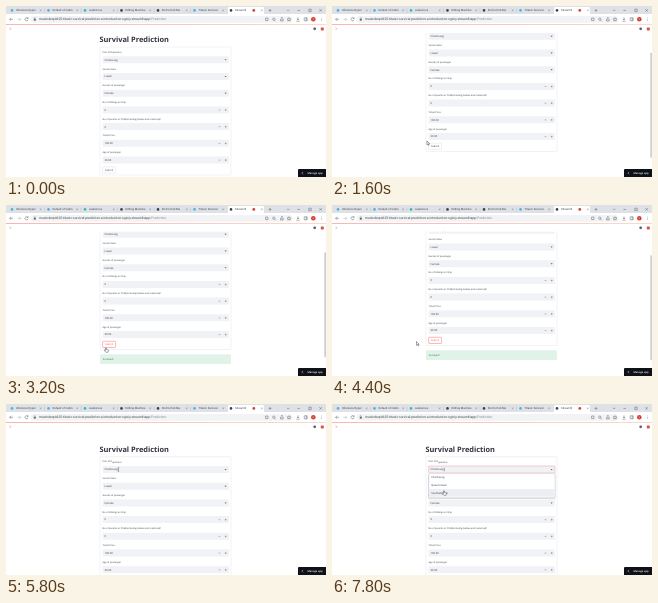
These frames come from a looping animation (320x171 px, 8000 ms). An HTML page:

```html
<!DOCTYPE html>
<html lang="en">
<head>
<meta charset="utf-8">
<title>Survival Prediction</title>
<style>
html, body { margin: 0; width: 100%; height: 100%; overflow: hidden; background: #fff; }
svg { display: block; width: 100vw; height: 100vh; }
text { font-family: "Open Sans", sans-serif; fill: #31333f; white-space: pre; text-rendering: geometricPrecision; }
.ui text { font-family: Roboto, sans-serif; fill: #3c4043; }
.line { fill: none; stroke: #5f6368; stroke-width: .5; }
</style>
</head>
<body>
<svg id="stage" viewBox="0 0 320 171">
  <defs>
    <linearGradient id="accent">
      <stop offset="0" stop-color="#f58a86"/><stop offset="1" stop-color="#f9c3b0"/>
    </linearGradient>
  </defs>
  <rect width="320" height="171" fill="#fff"/>
  <g id="page"></g>
  <g id="header"></g>
  <g id="browser" class="ui"></g>
  <g id="pointer"></g>
</svg>
<script>
const LOOP = 8000, STEP = 200, RED = '#ff4b4b';
const $ = id => document.getElementById(id);

function add(parent, tag, attrs, content) {
  const el = document.createElementNS('http://www.w3.org/2000/svg', tag);
  for (const k in attrs) el.setAttribute(k, attrs[k]);
  if (content !== undefined) el.textContent = content;
  parent.appendChild(el);
  return el;
}
const rect = (p, x, y, width, height, fill, more) => add(p, 'rect', { x, y, width, height, fill, ...more });
// A hair of rotation keeps tiny glyphs from being hinted flat
const text = (p, x, y, size, str, more) =>
  add(p, 'text', { x, y, 'font-size': size, transform: `rotate(.02 ${x} ${y})`, ...more }, str);
const path = (p, d, more) => add(p, 'path', { d, class: 'line', ...more });
const dot = (p, cx, cy, r, fill) => add(p, 'circle', { cx, cy, r, fill });
const show = (el, on) => el.setAttribute('display', on ? 'inline' : 'none');

// Form
const page = $('page');
text(page, 93.4, 36, 7.42, 'Survival Prediction', { 'font-weight': 700 });
rect(page, 94, 41, 131, 128, 'none', { rx: .8, stroke: '#dcdde2', 'stroke-width': .4 });

const fields = [
  ['Port of Departure', 'Cherbourg', true],
  ['Social Status', 'Lower', true],
  ['Gender of passenger', 'Female', true],
  ['No of Siblings on Ship', '0'],
  ['No of parents or Child(including babies and maternal)?', '0'],
  ['Ticket Price', '100.00'],
  ['Age of passenger', '30.00']
];
const boxes = fields.map(([label, value, select], i) => {
  const y = 50.3 + i * 16.7;
  text(page, 96.6, y - 3.5, 2.3, label);
  const box = rect(page, 96.6, y, 126.4, 7, '#f0f2f6', { rx: .7, 'stroke-width': .4 });
  text(page, 98.6, y + 4.4, 2.65, value);
  if (select) path(page, `M218.5 ${y + 3}h2.2l-1.1 1.3z`, { style: 'fill:#5c5e68;stroke:none' });
  else path(page, `M212.6 ${y + 3.6}h1.8M218.8 ${y + 3.6}h1.8m-.9-.9v1.8`, { style: 'stroke:#5c5e68;stroke-width:.4' });
  return box;
});
const caret = rect(page, 112.2, 52, .35, 3.6, '#31333f');

const submitBox = rect(page, 96.6, 160.8, 13, 6.2, '#fff', { rx: .7, 'stroke-width': .4 });
const submitText = text(page, 103.1, 164.8, 2.5, 'Submit', { 'text-anchor': 'middle' });

const result = add(page, 'g', {});
rect(result, 94, 173.7, 131, 9.8, '#e1f3e8', { rx: .7 });
text(result, 96.8, 179.5, 2.5, 'Survived!', { style: 'fill:#177233' });

const menu = add(page, 'g', {});
rect(menu, 96.2, 58.2, 127.2, 24.8, '#000', { rx: .9, opacity: .16 });
rect(menu, 96.8, 57.8, 126.2, 24.2, '#fff', { rx: .7, stroke: '#c2c4ca', 'stroke-width': .4 });
const hover = rect(menu, 97, 58.2, 125.8, 7.6, '#eceef3');
['Cherbourg', 'Queenstown', 'Southampton'].forEach((s, i) => text(menu, 99.2, 62.7 + i * 7.6, 2.65, s));

// Fixed page parts
const head = $('header');
rect(head, 0, 18, 320, 8.7, '#fff');
rect(head, 0, 18.1, 320, .7, 'url(#accent)');
path(head, 'M3.7 21.5l1.1 1.2-1.1 1.2', { style: 'stroke:#d9534a' });
dot(head, 308.7, 22.8, 1.4, '#5c5e68');
rect(head, 314.8, 21.6, 3, 2.8, '#d9534a', { rx: .6 });
const thumb = rect(head, 318.5, 22, 1.2, 105, '#b9bbbf', { rx: .5 });
rect(head, 292, 163, 30, 10, '#0e1117', { rx: 1 });
path(head, 'M297 165.9l-1.2 1.2 1.2 1.2', { style: 'stroke:#fff' });
text(head, 301.5, 168, 2.55, 'Manage app', { 'font-weight': 600, style: 'fill:#fff' });

// Browser frame
const ui = $('browser');
rect(ui, 0, 0, 320, 9, '#dee1e6');
rect(ui, 0, 8, 320, 10.1, '#fff');
rect(ui, 222, 1, 36, 9, '#fff', { rx: 1.4 });
const tabs = [
  ['Inference Hyper', '#4fb3dc'], ['Default of Cabin', '#4fb3dc'], ['seabornus', '#3fb8b4'],
  ['Editing Machine', '#3d434a'], ['End to End Ma', '#3d434a'], ['Titanic Survival', '#4fb3dc'],
  ['Streamlit', '#3d434a']
];
tabs.forEach(([name, color], i) => {
  const x = 6 + i * 36.5, last = i === tabs.length - 1;
  dot(ui, x, 4.4, 1.3, color);
  text(ui, x + 4, 5.3, 2.8, name);
  path(ui, `M${x + (last ? 30 : 27.8)} 3.5l1.7 1.7m0-1.7l-1.7 1.7`, { style: 'stroke-width:.35' });
  if (i < 5) path(ui, `M${x + 32.5} 2.6v3.8`, { style: 'stroke:#a4a8ae;stroke-width:.3' });
});
dot(ui, 247.8, 4.4, 1.4, '#d93f32');
path(ui, 'M262.6 4.4h2.8m-1.4-1.4v2.8M281 3.8l1.2 1.2 1.2-1.2M291.4 4.4h2.6M302.8 3.2h2.4v2.4h-2.4zM313.4 3.2l2.4 2.4m0-2.4l-2.4 2.4');

path(ui, 'M7 13.3H3.6m1.5-1.5l-1.5 1.5 1.5 1.5');
path(ui, 'M11.4 13.3h3.4m-1.5-1.5l1.5 1.5-1.5 1.5', { style: 'stroke:#a9acb0' });
path(ui, 'M21.8 12.2a1.6 1.6 0 1 0 .3 1.5M22.1 11.2v1.4h-1.4');
rect(ui, 24.5, 9.9, 262, 6.8, '#f1f3f4', { rx: 3.4 });
rect(ui, 27.8, 12.8, 2, 1.8, '#5f6368');
path(ui, 'M28.2 12.8v-.6a.6.6 0 0 1 1.2 0v.6', { style: 'stroke-width:.35' });
const url = text(ui, 33, 14.4, 3.3, 'maninderp4625-titanic-survival-prediction-a-introduction-ogioiy.streamlitapp');
add(url, 'tspan', { style: 'fill:#80868b' }, '/Prediction');
path(ui, 'M259.6 12h2.4v2.6h-2.4zM268.6 14.2l1.1 1.1M274.6 13v2h2.6v-2m-1.3 1v-2.6m-.8.8l.8-.8.8.8M283 11.6l.6 1.2 1.3.1-1 .9.3 1.3-1.2-.7-1.2.7.3-1.3-1-.9 1.3-.1z');
add(ui, 'circle', { cx: 267.8, cy: 13.2, r: 1.2, class: 'line' });
path(ui, 'M292 11.4v2.6m-1.1-1.1l1.1 1.1 1.1-1.1M290.4 15.2h3.2');
path(ui, 'M298.2 11.8h3v3h-3zM300.2 11.8v3');
dot(ui, 307.3, 13.3, 2.3, '#d93f32');
text(ui, 307.3, 14.3, 2.7, 's', { 'text-anchor': 'middle', style: 'fill:#fff' });
[11.9, 13.3, 14.7].forEach(y => dot(ui, 315.3, y, .35, '#5f6368'));

// Mouse pointers, hot spot at 0,0
const pointer = $('pointer');
const ink = { style: 'fill:#fff;stroke:#222;stroke-width:.4' };
const shapes = {
  arrow: path(pointer, 'M0 0v3.8l.9-.8.6 1.4.6-.3-.6-1.3h1.2z', ink),
  hand: path(pointer, 'M-.5.4q.5-.6 1 0v1.5l1.6.4q.5.2.4.8l-.4 1.6h-2.4l-1.5-2 .5-.4.8.6z', ink),
  beam: path(pointer, 'M-.7-1.8h1.4M0-1.8v3.6M-.7 1.8h1.4', { style: 'stroke:#333;stroke-width:.4' })
};

// Motion: [time, ...values]
const scrollKeys = [[400, 0], [1000, -23.5], [2400, -23.5], [2800, -24.5], [3800, -24.5], [4200, -28.5],
  [4400, -28.5], [4800, 11.7]];
const mouseKeys = [[800, 66, 139], [1200, 66, 139], [1600, 95, 135], [2000, 100, 142.5], [3600, 100, 142.5],
  [4000, 84.5, 136.5], [5000, 84.5, 136.5], [5800, 112.5, 65.5], [7000, 112.5, 65.5], [7200, 110, 74], [7800, 112, 86.5]];

function track(keys, t) {
  if (t <= keys[0][0]) return keys[0].slice(1);
  const i = keys.findIndex(k => k[0] >= t);
  if (i < 0) return keys[keys.length - 1].slice(1);
  const [a, b] = [keys[i - 1], keys[i]];
  const p = (t - a[0]) / (b[0] - a[0]);
  return a.slice(1).map((v, n) => v + (b[n + 1] - v) * p);
}

function draw(t) {
  const [scroll] = track(scrollKeys, t);
  const [x, y] = track(mouseKeys, t);
  const focused = t >= 6200;
  const open = t >= 7000;
  const pressed = t >= 2000;

  page.setAttribute('transform', `translate(0 ${scroll})`);
  thumb.setAttribute('y', 22 + (11.7 - scroll) * .7);
  show(thumb, scroll < 0);
  submitBox.setAttribute('stroke', pressed ? RED : '#d6d7dc');
  submitText.style.fill = pressed ? RED : '#31333f';
  show(result, t >= 2800);

  boxes[0].setAttribute('stroke', focused ? '#ee8587' : 'none');
  show(caret, focused);
  show(menu, open);
  const row = Math.max(0, Math.min(2, Math.floor((y - scroll - 58.2) / 7.6)));
  hover.setAttribute('y', 58.2 + row * 7.6);

  const over = t >= 7200 || (t >= 2000 && t < 3800);
  const kind = over ? 'hand' : t >= 5800 ? 'beam' : 'arrow';
  show(pointer, t >= 800);
  for (const k in shapes) show(shapes[k], k === kind);
  pointer.setAttribute('transform', `translate(${x} ${y})`);
}

const start = performance.now();
function tick() {
  const t = (performance.now() - start) % LOOP;
  draw(Math.floor(t / STEP) * STEP);
  requestAnimationFrame(tick);
}
tick();
</script>
</body>
</html>
```
